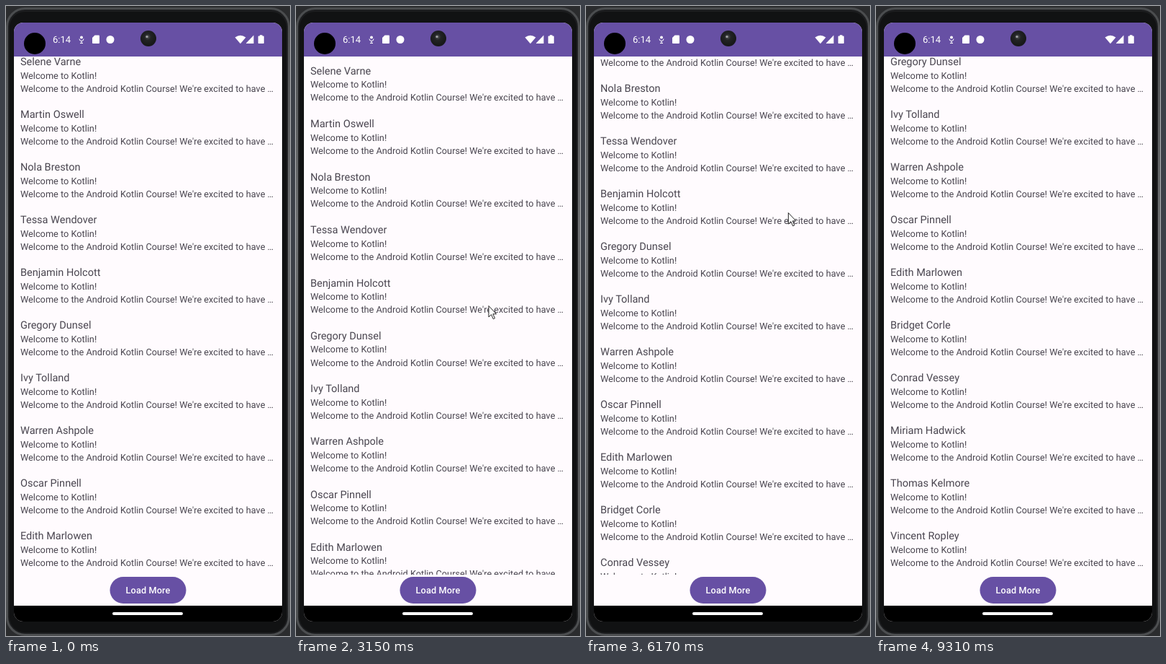
Recreate the animation shown at these times as an HTML page. Size 395x873 px, loop 9.97 s.

```html
<!DOCTYPE html>
<html lang="en">
<head>
<meta charset="utf-8">
<title>Mail list</title>
<style>
  html, body { margin: 0; width: 100%; height: 100%; overflow: hidden; background: #2b2c2e; }
  svg { display: block; width: 395px; height: 873px; font-family: Roboto, sans-serif; text-rendering: geometricPrecision; }
  .name { font-size: 14.5px; }
  .line { font-size: 12.74px; }
  #rows { fill: #49454f; }
</style>
</head>
<body>
<svg viewBox="0 0 395 873" xmlns="http://www.w3.org/2000/svg">
  <defs>
    <clipPath id="screen"><rect x="11" y="23" width="373" height="830" rx="13"/></clipPath>
    <clipPath id="list"><rect x="11" y="70" width="373" height="718"/></clipPath>
    <linearGradient id="edge" x2="0" y2="1">
      <stop offset="0" stop-color="#4a4c4e"/>
      <stop offset=".35" stop-color="#6c6e70"/>
      <stop offset="1" stop-color="#4c4e50"/>
    </linearGradient>
    <radialGradient id="lens" cx=".45" cy=".4">
      <stop offset="0" stop-color="#55575a"/>
      <stop offset=".4" stop-color="#232426"/>
      <stop offset="1" stop-color="#18191a"/>
    </radialGradient>
  </defs>

  <!-- Phone body -->
  <rect width="395" height="873" fill="#2b2c2e"/>
  <rect x="1.5" y="3.500" width="392" height="868" rx="25" fill="#1c1d1f" stroke="url(#edge)" stroke-width="3"/>
  <rect x="5" y="8" width="385" height="860" rx="21" fill="#111213"/>

  <g clip-path="url(#screen)">
    <rect x="11" y="23" width="373" height="830" fill="#fffbfe"/>
    <rect x="11" y="23" width="373" height="47" fill="#6750a4"/>
    <rect x="11" y="831" width="373" height="22"/>
  </g>
  <rect x="148" y="840" width="98" height="4" rx="2" fill="#fff"/>

  <!-- Status bar -->
  <circle cx="40" cy="52" r="15"/>
  <circle cx="198" cy="45" r="11" fill="url(#lens)"/>
  <circle cx="196" cy="42.5" r="1.6" fill="#a5a7aa"/>
  <g fill="#fff">
    <text x="65" y="51" font-size="13">6:14</text>
    <circle cx="105" cy="43.5" r="2"/>
    <path d="M102 45.500q0 3 3 3t3-3M105 48.500v3M103 51.500h4" fill="none" stroke="#fff"/>
    <path d="M123.500 40.500h5.500q1 0 1 1v9.500q0 1-1 1h-8q-1 0-1-1v-7z"/>
    <circle cx="145" cy="46.500" r="5.500"/>
    <path d="M318.500 43.500q7.500-5.500 15 0l-7.500 8.700z"/>
    <path d="M334 52v-.5l10.500-11V52z"/>
    <path d="M353 41.500v-1.300h3.500v1.300h1.500q.8 0 .8.800v9q0 .8-.8.800h-6.500q-.8 0-.8-.8v-9q0-.8.800-.8z"/>
  </g>

  <g id="rows" clip-path="url(#list)"></g>

  <rect x="144.500" y="791" width="106" height="37" rx="18.500" fill="#6750a4"/>
  <text x="197.500" y="814" text-anchor="middle" class="line" font-weight="500" letter-spacing=".09" fill="#fff">Load More</text>

  <path id="cursor" d="M.5.5v15.500l3.600-3.400 2.700 6.100 2.300-1-2.700-5.900h4.800z" fill="#fff" stroke="#222" stroke-linejoin="round"/>
</svg>

<script>
const LOOP = 9970, SETTLE = 260, LOADED_AT = 5300;
const TOP = 70, HEIGHT = 718, ROW = 73;
const NAMES = ["Selene Varne", "Martin Oswell", "Nola Breston", "Tessa Wendover",
  "Benjamin Holcott", "Gregory Dunsel", "Ivy Tolland", "Warren Ashpole", "Oscar Pinnell",
  "Edith Marlowen", "Bridget Corle", "Conrad Vessey", "Miriam Hadwick", "Thomas Kelmore",
  "Vincent Ropley"];
const LINES = ["Welcome to Kotlin!",
  "Welcome to the Android Kotlin Course! We're excited to have \u2026"];
const FIRST_BASELINE = 24.3, LINE_STEP = 18.2;

const endOf = count => count * ROW - HEIGHT;
const SHORT_END = endOf(10), LONG_END = endOf(NAMES.length);

// Pointer moves, each starting where the last ended. A move with `rest` drags
// the list, which settles at that offset once released.
const START = { at: 320, x: 350, y: 860 };
const MOVES = [
  { at: 1400, x: 282, y: 440 },
  { at: 1850, x: 288, y: 572, rest: 0 },
  { at: 2550, x: 290, y: 324, rest: SHORT_END },
  { at: 2900, x: 275, y: 377 },
  { at: 3740, x: 240, y: 554, rest: 0 },
  { at: 4460, x: 232, y: 565, rest: 0 },
  { at: 5100, x: 202, y: 808 },
  { at: 5400, x: 202, y: 808 },
  { at: 5850, x: 270, y: 407 },
  { at: 6190, x: 281, y: 285, rest: LONG_END },
  { at: 6700, x: 262, y: 308 },
  { at: 7220, x: 251, y: 190, rest: LONG_END },
  { at: 7480, x: 251, y: 190 },
  { at: 7960, x: 281, y: 698, rest: 0 },
  { at: 8250, x: 286, y: 770 },
  { at: 8560, x: 290, y: 400, rest: LONG_END },
  { at: 9300, x: 325, y: 885 }
];

const mix = (a, b, u) => a + (b - a) * u;
const clamp = (v, low, high) => Math.min(Math.max(v, low), high);
function ease(elapsed, duration) {
  const u = clamp(elapsed / duration, 0, 1);
  return u * u * (3 - 2 * u);
}

function poseAt(t) {
  let from = START, { x, y } = START, pull = SHORT_END, rest = SHORT_END;
  for (const move of MOVES) {
    if (t < from.at) break;
    const elapsed = Math.min(t, move.at) - from.at;
    const u = ease(elapsed, move.at - from.at);
    x = mix(from.x, move.x, u);
    y = mix(from.y, move.y, u);
    if (move.rest === undefined) {
      pull = mix(pull, rest, ease(elapsed, SETTLE));
    } else {
      pull += from.y - y;
      rest = move.rest;
    }
    from = move;
  }
  return { x, y, pull };
}

// Pulling past an end stretches the list away from that end, ever more stiffly.
function stretched(y, over) {
  const distance = Math.abs(over) / HEIGHT, u = y / HEIGHT;
  const size = HEIGHT * 0.016 * (distance + 1 - Math.exp(-8.24 * distance));
  return over < 0 ? y + size * u * (2 - u) : y - size * (1 - u * u);
}

const cursor = document.getElementById("cursor");
const rows = document.getElementById("rows");

function addText(content, className) {
  const text = document.createElementNS("http://www.w3.org/2000/svg", "text");
  text.setAttribute("x", 20);
  text.setAttribute("class", className);
  text.textContent = content;
  return rows.appendChild(text);
}

const texts = NAMES.flatMap((name, row) => [name, ...LINES].map((content, i) => ({
  node: addText(content, i ? "line" : "name"),
  y: row * ROW + FIRST_BASELINE + i * LINE_STEP
})));

function draw(t) {
  const { x, y, pull } = poseAt(t);
  const scroll = clamp(pull, 0, t < LOADED_AT ? SHORT_END : LONG_END);
  for (const text of texts) {
    const place = text.y - scroll;
    const visible = place > -30 && place < HEIGHT + 30;
    text.node.style.display = visible ? "" : "none";
    if (visible) text.node.setAttribute("y", (TOP + stretched(place, pull - scroll)).toFixed(2));
  }
  cursor.style.display = t >= START.at && t < 9300 ? "" : "none";
  cursor.setAttribute("transform", `translate(${x.toFixed(1)} ${y.toFixed(1)})`);
}

const start = performance.now();
function tick() {
  draw((performance.now() - start) % LOOP);
  requestAnimationFrame(tick);
}
tick();
</script>
</body>
</html>
```
